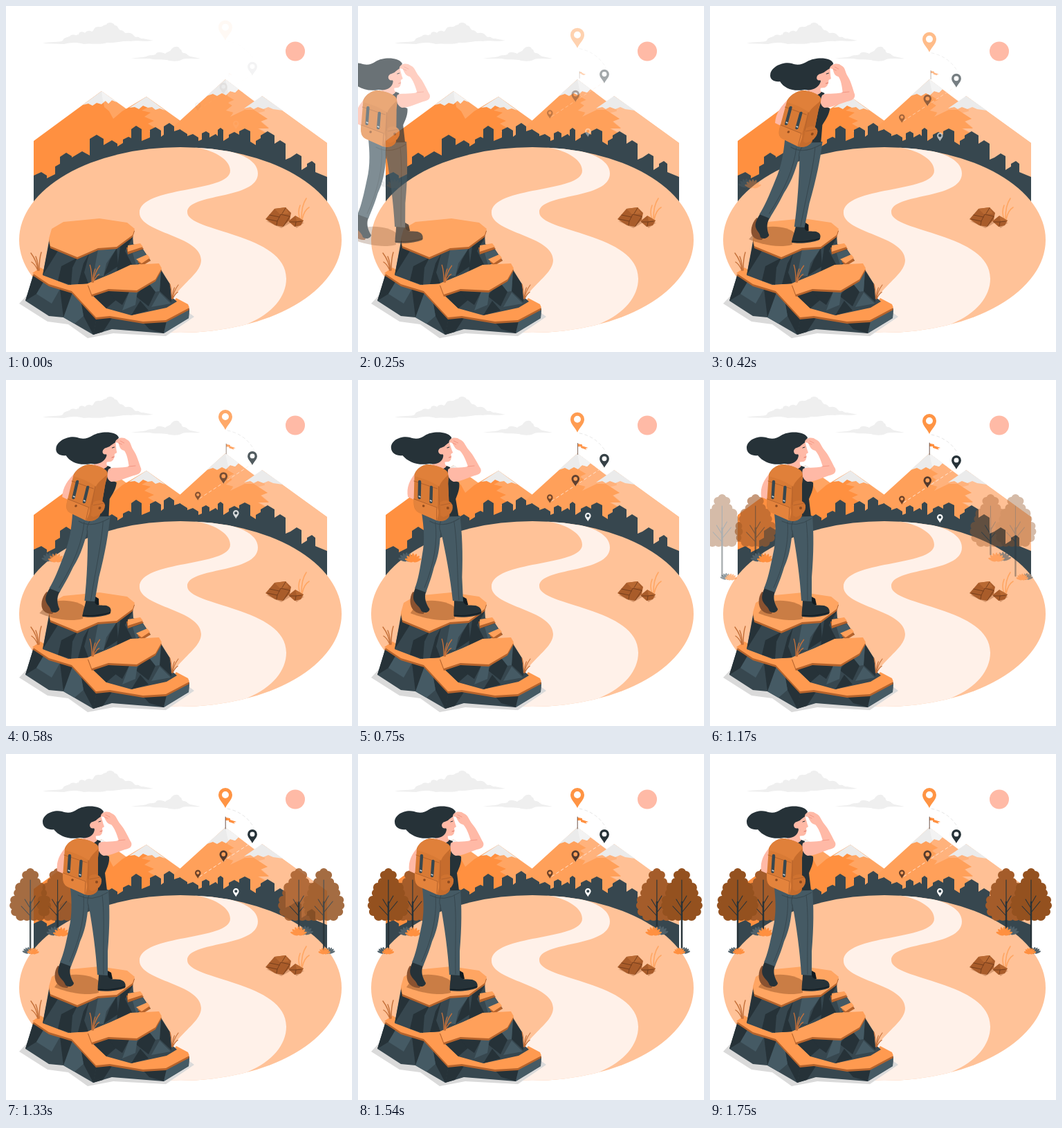
Animation of 500x500 px, one loop 1790 ms. Source, as an HTML page with a canvas:

```html
<!DOCTYPE html>
<html lang="en">
<head>
<meta charset="utf-8">
<title>Hiker at the lookout</title>
<style>
html, body { margin: 0; width: 100%; height: 100%; overflow: hidden; background: #fff; }
canvas { display: block; width: 500px; height: 500px; }
</style>
</head>
<body>
<canvas id="stage"></canvas>
<script>
const LOOP = 1790, FRAME = LOOP / 43, LEAD = 33;
const DPR = window.devicePixelRatio || 1;
const DARK = '#263238', SLATE = '#37474f', STEEL = '#455a64';
const ORANGE = '#ff9040', TOP = '#ffa05a', EDGE = '#b5632c', SKIN = '#ffb9a6', SNOW = '#ebebeb';

function sheet(el) {
  el.width = el.height = 500 * DPR;
  const c = el.getContext('2d');
  c.scale(DPR, DPR);
  return c;
}
const newSheet = () => sheet(document.createElement('canvas'));
const main = sheet(document.getElementById('stage'));
const layer = newSheet(), back = newSheet();
let g = back;

const paths = {};
const shape = d => paths[d] || (paths[d] = new Path2D(d));
function fill(color, ...list) {
  g.fillStyle = color;
  for (const d of list) g.fill(shape(d), 'evenodd');
}
function line(color, width, ...list) {
  g.strokeStyle = color;
  g.lineWidth = width;
  g.lineCap = g.lineJoin = 'round';
  for (const d of list) g.stroke(shape(d));
}
function dot(color, x, y, r) {
  g.fillStyle = color;
  g.beginPath();
  g.arc(x, y, r, 0, 7);
  g.fill();
}
function at(x, y, s, draw) {
  g.save();
  g.translate(x, y);
  g.scale(s, s);
  draw();
  g.restore();
}

// Draws a whole group off screen, then lays it down with one opacity.
function group(alpha, draw, dx = 0, dy = 0, skew = 0, originY = 0) {
  if (alpha <= 0) return;
  layer.clearRect(0, 0, 500, 500);
  g = layer;
  g.save();
  g.transform(1, 0, skew, 1, dx - skew * originY, dy);
  draw();
  g.restore();
  g = main;
  g.globalAlpha = Math.min(1, alpha);
  g.drawImage(layer.canvas, 0, 0, 500, 500);
  g.globalAlpha = 1;
}

function bezier(x1, y1, x2, y2) {
  const f = (a, b, s) => 3 * a * s * (1 - s) ** 2 + 3 * b * s * s * (1 - s) + s ** 3;
  return x => {
    if (x <= 0) return 0;
    if (x >= 1) return 1;
    let lo = 0, hi = 1;
    for (let i = 0; i < 24; i++) {
      const mid = (lo + hi) / 2;
      if (f(x1, x2, mid) < x) lo = mid; else hi = mid;
    }
    return f(y1, y2, lo);
  };
}
const easeOut = bezier(0, 0, .58, 1);
const spring = bezier(.36, -.01, .5, 1.38);

function sky() {
  fill('#efefef',
    'M53 54C64 51 78 53 82 50C84 44 91 46 94 42C99 40 102 44 105 41C106 36 112 37 114 39C117 35 121 35 124 37C128 35 126 30 134 30C139 31 141 27 145 27C147 22 156 24 157 28C163 28 161 34 166 35C171 35 170 40 175 39C183 38 184 43 187 45C194 44 193 48 198 47L213 50C198 52 190 49 180 51C168 50 158 54 146 53C134 57 122 53 112 55C102 52 92 53 84 55Z',
    'M181 76C190 74 196 75 203 73C208 70 212 72 216 70C218 65 226 67 230 69C233 66 236 66 238 64C241 58 250 57 251 62C256 64 252 67 257 68C262 68 262 72 267 73L281 76C270 77 262 75 255 77C249 81 238 80 233 78C224 77 214 78 207 76Z');
  dot('#ffbaa6', 418, 65.5, 14);
}

function mountains() {
  fill('#ffa563', 'M138 123L260 210V260H100Z', 'M203 131L300 200V260H150Z');
  fill(ORANGE, 'M40 195L138 123L142 146L149 152L155 163L168 152L203 131L206 146L196 151L209 154L200 160L214 166L205 170L217 177L206 181L220 190L240 260H40Z');
  fill('#ffb27c', 'M317 106L362 140L370 130L464 198V260H300Z');
  fill('#ffc095', 'M370 130L464 198V260H380L382 186L364 176L380 176L368 166L378 163L362 155L374 152Z');
  fill(TOP, 'M317 106L250 167L200 212V260H345L382 187L364 177L380 177L368 167L378 163L358 150L345 150L324 160L329 154L318 151L327 144L321 140L330 136L320 130Z');
  fill('#ffb27c', 'M320 127L341 124L352 140L340 150L326 156L331 152L318 151L328 143L322 139L331 135Z');
  fill(SNOW,
    'M138 123L111 143L119 141L125 144L131 140L138 142L144 137L148 141L153 136L160 139Z',
    'M203 131L178 147L186 146L192 149L198 144L205 147L211 146L216 150L222 148L230 151Z',
    'M317 106L290 130L299 127L305 130L312 126L318 129L324 123L331 125L336 120Z',
    'M370 130L344 148L353 146L358 149L364 146L372 149L379 146L386 149L400 151Z');
  fill('#f3f3f3', 'M138 123L140 138L144 137L148 141L153 136L160 139Z', 'M317 106L321 125L324 123L331 125L336 120Z');
}

function city() {
  fill(SLATE,
    'M40 245L51 240L59 245V249L71 243V232L78 228V218L87 212L95 217V219L110 210L121 216V192L131 186L141 192V201L153 194L161 199V203L169 198V193L177 189L181 191V178L188 173L196 178V195L208 190V179L216 175L224 180V189L228 186V174L236 169L243 174V181L252 178V285H40Z',
    'M251 178L262 185V188L270 185L278 190V195L283 193V184L289 181L294 184V190L303 185L306 188V179L310 176L314 179V195L322 190V186L330 182L337 186V181L345 177L353 181V196L361 201V195L368 191V187L378 181L388 187V199L396 194L404 199V222L411 219L420 213L427 217V237L435 232V228L442 224L447 228V240L464 247V285H251Z');
}

function ground() {
  g.save();
  g.beginPath();
  g.ellipse(252, 338, 233, 134, 0, 0, 7);
  g.fillStyle = '#ffc298';
  g.fill();
  g.clip();
  fill('#fff1e9', 'M266 203C304 208 324 223 324 238C324 270 193 260 193 299C193 328 282 332 282 367C282 395 225 410 225 475H330L350 459C385 444 405 420 405 394C405 328 262 327 262 298C262 270 364 280 364 242C364 220 330 208 285 203Z');
  g.restore();
}

function logs() {
  line('#ffa663', 1.6, 'M425 308Q421 298 425 288', 'M427 307Q427 288 434 278', 'M428 308Q431 295 438 291');
  fill('#d99a70', 'M376 311L398 321L412 313L420 321L431 313Z');
  fill('#a95c2a', 'M375 308L388 293L404 291L412 299L410 309L400 319L389 317Z', 'M408 311L418 303L430 310L426 317L417 319Z');
  fill('#b96932', 'M388 293L404 291L409 300L396 301Z', 'M418 303L430 310L420 311Z');
  line('#713b1a', .9, 'M378 308L392 311L397 301L410 304L401 318M392 311L391 317M381 302L395 305M404 292L399 300M410 312L419 312L427 311M419 312L418 318');
}

function tuft(x, y, s, flip) {
  g.save();
  g.translate(x, y);
  g.scale(flip * s, s);
  line('#c4703a', 1.4, 'M0 0Q-1 -13 -10 -25', 'M1 0Q0 -13 -3 -20', 'M2 0Q2 -17 5 -26', 'M0 0Q-4 -9 -9 -12');
  g.restore();
}

function rock() {
  fill('#dadada', 'M19 430L34 414L126 462L260 440L272 449L231 477L155 473L118 480L90 460L60 456Z');
  fill(SLATE, 'M39 390L28 426L62 448L83 450L126 475L153 467L228 473L264 451L265 437L120 400Z');
  fill(DARK, 'M39 390L28 426L44 416L54 399Z', 'M78 409L96 414L104 425L83 450Z', 'M131 450L126 475L112 448L108 425Z', 'M131 450L153 451L140 471L126 475Z', 'M199 458L232 456L228 473L207 467Z');
  fill(STEEL, 'M54 399L78 409L66 430L44 416Z', 'M96 414L108 425L112 448L99 459L83 450Z', 'M232 456L265 437L264 451L228 473Z');
  const shelf = 'M38 386L50 378L62 386L90 402L119 401L146 433L182 441L239 431L246 422L263 431L265 436L231 454L198 456L150 448L130 450L95 412L62 402Z';
  at(0, 3, 1, () => fill(EDGE, shelf));
  fill('#ff9a50', shelf);

  fill(SLATE, 'M62 340L53 389L90 403L119 401L160 384L209 368L197 350L184 344L183 330Z');
  fill(DARK, 'M62 344L75 354L53 389Z', 'M103 364L96 378L94 403L75 397L80 376Z', 'M120 358L113 385L119 401L104 402L112 372Z', 'M160 350L162 376L141 390L150 367Z', 'M184 333L172 354L183 375L160 384L165 348Z');
  fill(STEEL, 'M133 352L160 350L145 372L141 390L126 390Z', 'M183 357L198 352L204 362L188 374Z');
  fill(EDGE, 'M174 349L195 346L199 351L176 359Z', 'M190 369L205 362L209 368L196 376Z');
  fill(TOP, 'M176 346L194 343L198 348L176 355Z', 'M188 366L204 359L208 364L196 372Z');
  const peak = 'M62 336L66 322L83 312L135 307L175 313L186 322L183 331L160 348L133 350L103 363L64 347Z';
  at(0, 3, 1, () => fill(EDGE, peak));
  fill('#ffa562', peak);

  fill(SLATE, 'M124 417L148 410L190 411L224 381L237 402L239 420L247 427L232 436L181 447L145 437Z');
  fill(DARK, 'M124 417L148 412L160 424L145 437Z', 'M148 412L178 413L168 432L158 425Z', 'M205 399L216 413L206 434L187 419Z', 'M224 383L222 412L239 428L237 402Z', 'M181 447L194 426L206 440Z');
  fill(STEEL, 'M178 413L190 412L187 432L168 440Z', 'M205 399L224 383L222 412L216 413Z', 'M210 435L222 414L238 430Z');
  const step = 'M118 401L150 388L180 374L221 372L225 379L216 395L189 411L148 409L124 417Z';
  at(0, 3, 1, () => fill(EDGE, step));
  fill(TOP, step);
  tuft(46, 382, 1, 1);
  tuft(126, 399, .95, -1);
  tuft(241, 423, .8, -1);
}

const pin = (color, x, tip, s) => at(x, tip, s, () =>
  fill(color, 'M0 0C-3 -7 -10 -12 -10 -19A10 10 0 0 1 10 -19C10 -12 3 -7 0 0ZM5 -19A5 5 0 1 0 -5 -19A5 5 0 1 0 5 -19Z'));

function pins() {
  g.setLineDash([4, 4]);
  line('#e2e2e2', .9, 'M320 79Q345 84 358 106');
  line('#ffe9dc', .9, 'M280 177L356 127');
  g.setLineDash([]);
  pin('#ff9444', 317, 78, 1);
  pin(DARK, 356, 129, .69);
  pin('#543a2d', 314.3, 156, .58);
  pin('#6b4128', 277.3, 180, .43);
  pin('#fff', 332.3, 206.5, .43);
}

function flag() {
  fill(ORANGE, 'M317 91.5L324 93V95L333 98L329 99L331 101L322 98V96L317 96Z');
  line('#6d5347', 1, 'M317.2 91V108');
}

// Lumps along the right edge of a crown, mirrored to the left.
const LOBES = [[0, 171, 6], [6, 175, 6], [9, 185, 6], [15, 193, 7], [18, 201, 6], [23, 211, 6], [24, 219, 6], [22, 228, 6], [14, 234, 7], [5, 234, 7]];
function tree(x, base, color) {
  g.fillStyle = color;
  g.beginPath();
  for (const [dx, y, r] of LOBES)
    for (const side of [-1, 1]) {
      g.moveTo(x + side * dx + r, y);
      g.arc(x + side * dx, y, r, 0, 7);
    }
  g.moveTo(x, LOBES[0][1]);
  for (const [dx, y] of LOBES) g.lineTo(x + dx, y);
  for (const [dx, y] of [...LOBES].reverse()) g.lineTo(x - dx, y);
  g.fill();
  at(x, 0, 1, () => line(DARK, 1.1, 'M0 182V215', 'M0 217L7 205', 'M0 223L-8 210', 'M0 229L13 213', 'M0 234L-13 220'));
  line(DARK, 2.4, `M${x} 214V${base}`);
}

function fan(color, x, y, r) {
  g.fillStyle = color;
  for (let i = -3; i <= 3; i++) {
    g.save();
    g.translate(x, y);
    g.rotate(i * .4);
    g.beginPath();
    g.ellipse(0, -r * .6, r * .18, r * .55, 0, 0, 7);
    g.fill();
    g.restore();
  }
}
function bush(x, y, r, side) {
  fan('#4f6069', x + side * r * .6, y - r * .1, r);
  fan(ORANGE, x - side * r * .25, y, r);
}

function legs() {
  fill('rgba(100,50,15,.34)', 'M80 323C95 315 125 319 134 328V345C112 351 82 342 70 337Z');
  fill('#8a5230', 'M75 306C69 314 69 327 75 333C79 337 84 338 89 338L92 331L82 309Z');
  fill(DARK, 'M79 300L94 306C90 315 94 325 98 331C97 337 89 337 86 334C84 327 79 326 76 319C74 313 76 307 79 300Z');
  fill('#121b20', 'M145 312L152 316L154 325L146 326Z');
  fill(DARK, 'M134 317L147 319C148 327 155 325 165 326C172 328 174 333 172 338C163 342 145 344 133 342C132 335 134 328 134 317Z');
  line('#101a20', 1.2, 'M133 340Q153 342 172 336');
  fill(STEEL, 'M93 193L148 196C150 222 150 250 147 285V320L132 319C130 285 125 250 119 216C117 244 113 258 107 271C103 285 98 296 94 307L78 301C83 290 87 272 91 252C96 232 95 212 93 193Z');
  line(SLATE, 1, 'M119 220Q116 212 120 204', 'M112 205C114 230 109 262 92 300', 'M139 204C143 235 140 270 141 318', 'M104 204Q124 215 147 200');
}

function pack() {
  fill('#d87a35', 'M85 136C89 127 98 122 107 122L130 130C134 132 135 138 133 150V194C131 203 122 205 114 203L90 192C83 189 82 184 82 178Z');
  fill('#c66c2d', 'M119 152L133 137V196C130 203 122 205 115 203Z');
  fill('#e0803a', 'M85 139C88 127 99 121 108 122C122 125 133 128 133 137C128 143 123 146 120 154C110 147 97 142 85 139Z');
  fill('#e4833c', 'M82 171L115 183C119 187 117 197 114 203L89 192C83 189 82 183 82 171Z');
  fill('#cf7230', 'M120 177C126 172 135 173 138 181C139 190 133 196 124 198L120 196Z');
  line(EDGE, 1, 'M84 146L117 157M83 172L115 184L114 202M121 181L136 178M119 154V180');
  line(SLATE, 4.4, 'M92 147L90.5 170', 'M108.5 155L107 176');
  line('#cfd4d6', 1.4, 'M90 168L92 169', 'M106 174L108 175');
  dot('#8d4a1f', 131, 185, 2);
  dot('#8d4a1f', 96, 182, 1.8);
}

function person() {
  legs();
  fill(SKIN, 'M87 134C78 144 72 155 74 169L83 173Z', 'M111 112L129 111L130 122C134 127 137 130 138 137L112 132Z');
  fill(DARK, 'M106 125L112 124C117 130 128 131 132 124L137 126C134 135 139 145 149 148C150 157 146 165 143 172L146 197L102 198Z');
  line(EDGE, 3, 'M108 124Q126 126 133 137');
  fill(SKIN, 'M123 95L137 88C139 95 140 100 142 105L139 107C140 112 139 117 135 118L126 119Z');
  line('#d9705f', .9, 'M136 112L139 111');
  line(DARK, 1, 'M134 98L137 97');
  fill(DARK, 'M141 83C135 73 112 74 103 80C96 85 89 86 81 83C67 80 53 88 53 98C53 107 62 110 69 109C77 119 91 124 107 121C119 123 127 118 128 109L123 99L130 96C134 91 139 92 141 83Z');
  dot(SKIN, 125.5, 103, 4.5);
  fill(SKIN, 'M137 90C137 84 147 81 153 86C160 89 160 95 165 101C172 109 177 121 181 128C183 134 178 137 172 138C161 142 150 147 141 147C134 144 132 137 134 129C138 125 152 128 163 125C160 116 157 107 152 102C147 101 144 97 142 91Z');
  line('#f08f7c', .8, 'M162 125L172 124', 'M142 91L147 93', 'M144 88L150 91');
  pack();
}

const LEAN_IN = Math.tan(Math.PI / 9), LEAN_BACK = -Math.tan(Math.PI / 18), LEAN_REST = Math.tan(Math.PI / 90);
function walkIn(p) {
  if (p < .6) {
    const e = spring(p / .6);
    return [e, 250 * (e - 1), LEAN_IN + (LEAN_BACK - LEAN_IN) * e];
  }
  if (p < .8) return [1, 0, LEAN_BACK + (LEAN_REST - LEAN_BACK) * spring((p - .6) / .2)];
  return [1, 0, LEAN_REST * (1 - spring((p - .8) / .2))];
}

function render(t) {
  g = main;
  g.clearRect(0, 0, 500, 500);
  g.drawImage(back.canvas, 0, 0, 500, 500);

  const drop = easeOut((t + LEAD) / 1000);
  group(drop, () => at(324, 99.5, .25 + .75 * drop, () => {
    g.translate(-324, -99.5);
    flag();
  }));
  group(drop, pins, 0, 30 * (drop - 1));

  const grow = spring((t - 725) / 1000), early = spring((t - 75) / 1000);
  const near = 30 * (grow - 1);
  group(grow, () => tree(77, 252, '#a45c2a'), near);
  group(grow * grow, () => {
    tree(40, 283, '#94511f');
    tree(428, 252, '#a45c2a');
    tree(464, 283, '#94511f');
  }, 2 * near);
  group(early, () => bush(77, 263, 11, -1), 30 * (early - 1));
  group(grow, () => {
    bush(39.5, 289, 8, -1);
    bush(428, 262, 11, 1);
    bush(464.5, 289, 8, 1);
  }, near);

  const [alpha, dx, lean] = walkIn((t + LEAD) / 1000);
  group(alpha, person, dx, 0, lean, 211);
}

[sky, mountains, city, ground, logs, rock].forEach(draw => draw());

const start = performance.now();
function tick() {
  const t = (performance.now() - start) % LOOP;
  render(Math.floor((t + 5) / FRAME) % 43 * FRAME);
  requestAnimationFrame(tick);
}
tick();
</script>
</body>
</html>
```
